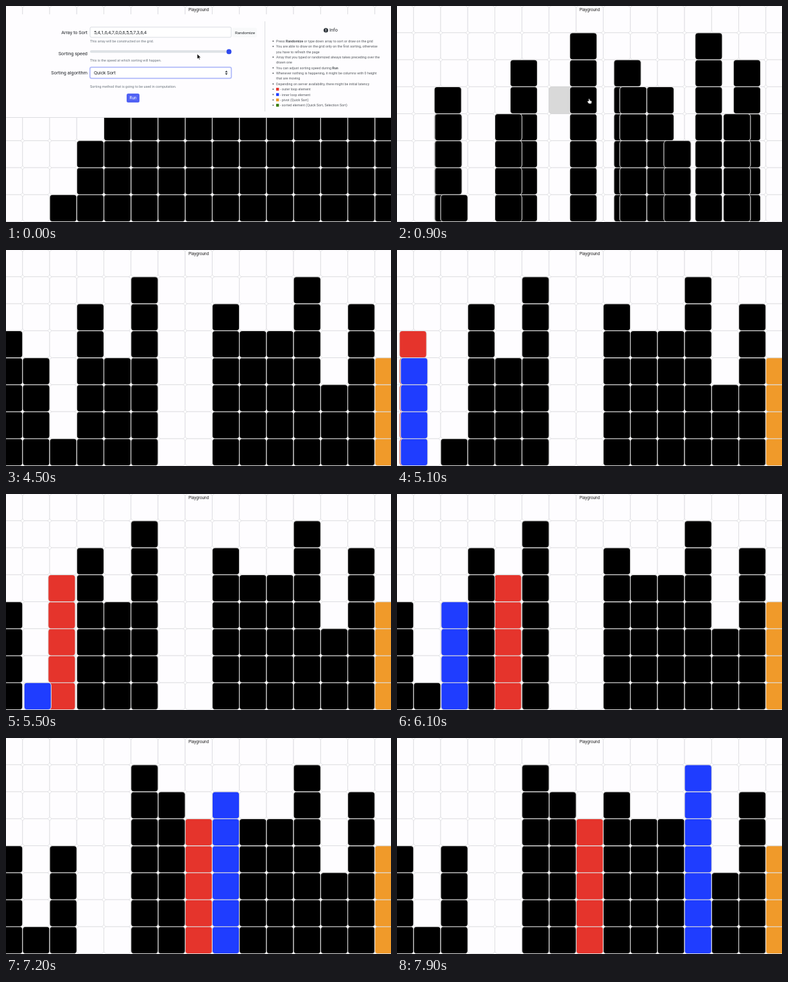
An HTML page with a canvas that plays this animation: 600 by 338 pixels, repeating every 8 s.

```html
<!DOCTYPE html>
<html lang="en">
<head>
<meta charset="utf-8">
<title>Sorting playground</title>
<style>
  html, body { margin: 0; width: 100%; height: 100%; overflow: hidden; background: #fff; }
  #stage { position: relative; width: 600px; height: 338px; overflow: hidden; }
  canvas, #panel, #overlay { position: absolute; left: 0; top: 0; }
  canvas { width: 600px; height: 338px; }
  #panel { top: 13px; width: 600px; overflow: hidden; background: #fefdff; box-shadow: inset 0 -1px #dcdce0; }
  svg { display: block; font-family: Roboto, Arial, sans-serif; }
  .label { font-size: 7.35px; fill: #212529; }
  .right { text-anchor: end; }
  .mid { text-anchor: middle; }
  .help { font-size: 5.45px; fill: #6c757d; }
  #notes { font-size: 5.4px; fill: #55595e; }
</style>
</head>
<body>
<div id="stage">
  <canvas id="grid"></canvas>
  <div id="panel">
    <svg width="600" height="162" viewBox="0 13 600 162">
      <g class="label right">
        <text x="127" y="43.8">Array to Sort</text>
        <text x="127" y="77.4">Sorting speed</text>
        <text x="127" y="107">Sorting algorithm</text>
      </g>
      <rect x="131" y="33" width="220" height="16" rx="2" fill="#fff" stroke="#ced4da" stroke-width=".8"/>
      <text class="label" x="137" y="43.8">5,4,1,6,4,7,0,0,6,5,5,7,3,6,4</text>
      <rect x="353" y="34" width="38" height="15" rx="2" fill="#f8f9fa"/>
      <text class="mid" x="372.5" y="43.8" font-size="6.2" fill="#212529">Randomize</text>
      <text class="help" x="131" y="57">This array will be constructed on the grid.</text>
      <rect x="131" y="69.3" width="220" height="4" rx="2" fill="#dee2e6"/>
      <circle cx="347.5" cy="71.4" r="3.9" fill="#2f49ee"/>
      <text class="help" x="131" y="87">This is the speed at which sorting will happen.</text>
      <rect x="131" y="96" width="220" height="17" rx="2" fill="#fff" stroke="#d3d8fd" stroke-width="2.4"/>
      <rect x="131" y="96" width="220" height="17" rx="2" fill="#fff" stroke="#8c9af6" stroke-width=".9"/>
      <text class="label" x="137" y="107">Quick Sort</text>
      <path d="M341.4 103.7l2-2.6 2 2.6zM341.4 105.3l2 2.6 2-2.6z" fill="#343a40"/>
      <text class="help" x="131" y="128">Sorting method that is going to be used in computation.</text>
      <rect x="188" y="137" width="20" height="14" rx="2.5" fill="#5162f4"/>
      <text class="mid" x="198" y="146.3" font-size="6.3" fill="#fff">Run</text>
      <path d="M403.5 24V165" stroke="#dcdce0"/>
      <circle cx="498.5" cy="38" r="3.6" fill="#343a40"/>
      <path d="M498.5 36v2.5m0 .8v.8" stroke="#fff" stroke-width=".8"/>
      <text x="504" y="40.4" font-size="7.4" fill="#212529">Info</text>
      <g id="notes"></g>
    </svg>
  </div>
  <svg id="overlay" width="600" height="338">
    <text class="mid" x="300.2" y="8.3" font-size="6.4" fill="#222">Playground</text>
    <path id="arrow" d="M0 0V8L1.9 6.3 3.1 9 4.3 8.4 3.1 5.8H5.7z" fill="#000" stroke="#fff" stroke-width=".6"/>
    <path id="hand" d="M-1.2-3.4Q-.2-4.4.5-3L1.1-.9 3.3-.3Q4.2 0 3.9 1.2L3.2 4.2H-.8L-3.2 1Q-3.3-.2-2-.1L-1-.1z" fill="#fff" stroke="#000" stroke-width=".6"/>
  </svg>
</div>
<script>
const LOOP = 8000, PITCH = 42.23, LEFT = -16.4, BOTTOM = 337.5;
const RED = '#e5342c', BLUE = '#1f3dff', ORANGE = '#f09a2a', GREEN = '#3a7d0c';
const heights = [5, 4, 1, 6, 4, 7, 0, 0, 6, 5, 5, 7, 3, 6, 4];
const sortedColumn = [9, 5, 2, 11, 4, 14, 0, 1, 10, 7, 8, 13, 3, 12, 6];
const PIVOT = 14, PIVOT_AT = 4500, FIRST_STEP = 4743, STEP = 276, SWAP = 290;

// Empty cells shaded under the pointer: column, row, from, to
const hovers = [[6, 3, 740, 1000], [7, 5, 1550, 1750], [7, 6, 1700, 1870], [7, 7, 1870, 1990]];
// Pointer path: time, x, y
const pointer = [[0, 298, 75], [90, 298, 75], [450, 198, 144], [550, 198, 144], [900, 299.5, 148.5],
  [1100, 346, 197], [1400, 346, 197], [1700, 312, 255], [2000, 312, 348]];

const $ = id => document.getElementById(id);
const clamp = v => Math.min(1, Math.max(0, v));
const mix = (a, b, p) => a + (b - a) * p;

// CSS "ease": cubic-bezier(.25, .1, .25, 1)
function ease(x) {
  x = clamp(x);
  let lo = 0, hi = 1;
  const curve = (a, b, s) => 3 * a * s * (1 - s) ** 2 + 3 * b * s * s * (1 - s) + s ** 3;
  for (let n = 0; n < 24; n++) {
    const s = (lo + hi) / 2;
    if (curve(.25, .25, s) < x) lo = s; else hi = s;
  }
  return curve(.1, 1, lo);
}

function buildNotes() {
  const lines = [
    '•Press <tspan font-weight="700">Randomize</tspan> or type down array to sort or draw on the grid',
    '•You are able to draw on the grid only on the first sorting, otherwise',
    'you have to refresh the page',
    '•Array that you typed or randomized always takes preceding over the',
    'drawn one',
    '•You can adjust sorting speed during <tspan font-weight="700">Run</tspan>',
    '•Whenever nothing is happening, it might be columns with 0 height',
    'that are moving',
    '•Depending on server availability, there might be initial latency',
    '•- outer loop element', '•- inner loop element', '•- pivot (Quick Sort)',
    '•- sorted element (Quick Sort, Selection Sort)'];
  $('notes').innerHTML = lines.map((line, n) => {
    const y = 55 + n * 8.36, color = [RED, BLUE, ORANGE, GREEN][n - 9];
    const bullet = line[0] === '•' ? `<circle cx="416.3" cy="${y}" r="1"/>` : '';
    const swatch = color ? `<rect x="421" y="${y - 2.2}" width="4.4" height="4.4" fill="${color}"/>` : '';
    return `${bullet}${swatch}<text x="${color ? 427 : 421}" y="${y + 1.9}">${line.replace('•', '')}</text>`;
  }).join('');
}

// Columns and colours of all bars at time t, following a Lomuto partition
function barsAt(t) {
  const arrival = ease((t - 600) / 600);
  const columns = heights.map((_, i) => mix(sortedColumn[i], i, arrival));
  const colors = heights.map(() => '#000');
  const order = heights.map((_, i) => i);
  let store = 0, red = -1, blue = -1;
  for (let j = 0; j < PIVOT; j++) {
    const start = FIRST_STEP + j * STEP;
    if (t < start) break;
    blue = order[j];
    if (heights[blue] > heights[PIVOT]) continue;
    red = order[store];
    const p = ease((t - start) / SWAP);
    columns[blue] = mix(j, store, p);
    columns[red] = mix(store, j, p);
    order[store] = blue;
    order[j] = red;
    store++;
  }
  if (red >= 0) colors[red] = RED;
  if (blue >= 0) colors[blue] = BLUE;
  if (t >= PIVOT_AT) colors[PIVOT] = ORANGE;
  return { columns, colors };
}

const canvas = $('grid'), ctx = canvas.getContext('2d');
const ratio = window.devicePixelRatio || 1;
canvas.width = 600 * ratio;
canvas.height = 338 * ratio;
ctx.scale(ratio, ratio);

function cell(column, row, fill, stroke, lineWidth) {
  ctx.beginPath();
  ctx.roundRect(LEFT + column * PITCH, BOTTOM - (8 - row) * PITCH, PITCH, PITCH, 4.5);
  ctx.fillStyle = fill;
  ctx.fill();
  ctx.strokeStyle = stroke;
  ctx.lineWidth = lineWidth;
  ctx.stroke();
}

function drawGrid(t) {
  ctx.fillStyle = '#fff';
  ctx.fillRect(0, 0, 600, 338);
  for (let c = 0; c < 15; c++)
    for (let r = 0; r < 8; r++) cell(c, r, '#fefdff', '#dadade', .8);
  for (const [c, r, from, to] of hovers)
    if (t >= from && t < to) cell(c, r, '#d9d9d9', '#d4d4d4', .8);
  const { columns, colors } = barsAt(t);
  heights.forEach((height, i) => {
    for (let k = 1; k <= height; k++) cell(columns[i], 8 - k, colors[i], '#dedede', 1.1);
  });
}

function drawPointer(t) {
  const n = pointer.findIndex(key => key[0] > t);
  const visible = n > 0, hand = t >= 420;
  $('arrow').style.display = visible && !hand ? '' : 'none';
  $('hand').style.display = visible && hand ? '' : 'none';
  if (!visible) return;
  const [t0, x0, y0] = pointer[n - 1], [t1, x1, y1] = pointer[n];
  const p = (t - t0) / (t1 - t0);
  $(hand ? 'hand' : 'arrow').setAttribute('transform', `translate(${mix(x0, x1, p)} ${mix(y0, y1, p)})`);
}

function frame(now) {
  const t = now % LOOP;
  drawGrid(t);
  $('panel').style.height = 162 * (1 - ease((t - 480) / 350)) + 'px';
  drawPointer(t);
  requestAnimationFrame(frame);
}

buildNotes();
frame(0);
</script>
</body>
</html>
```
